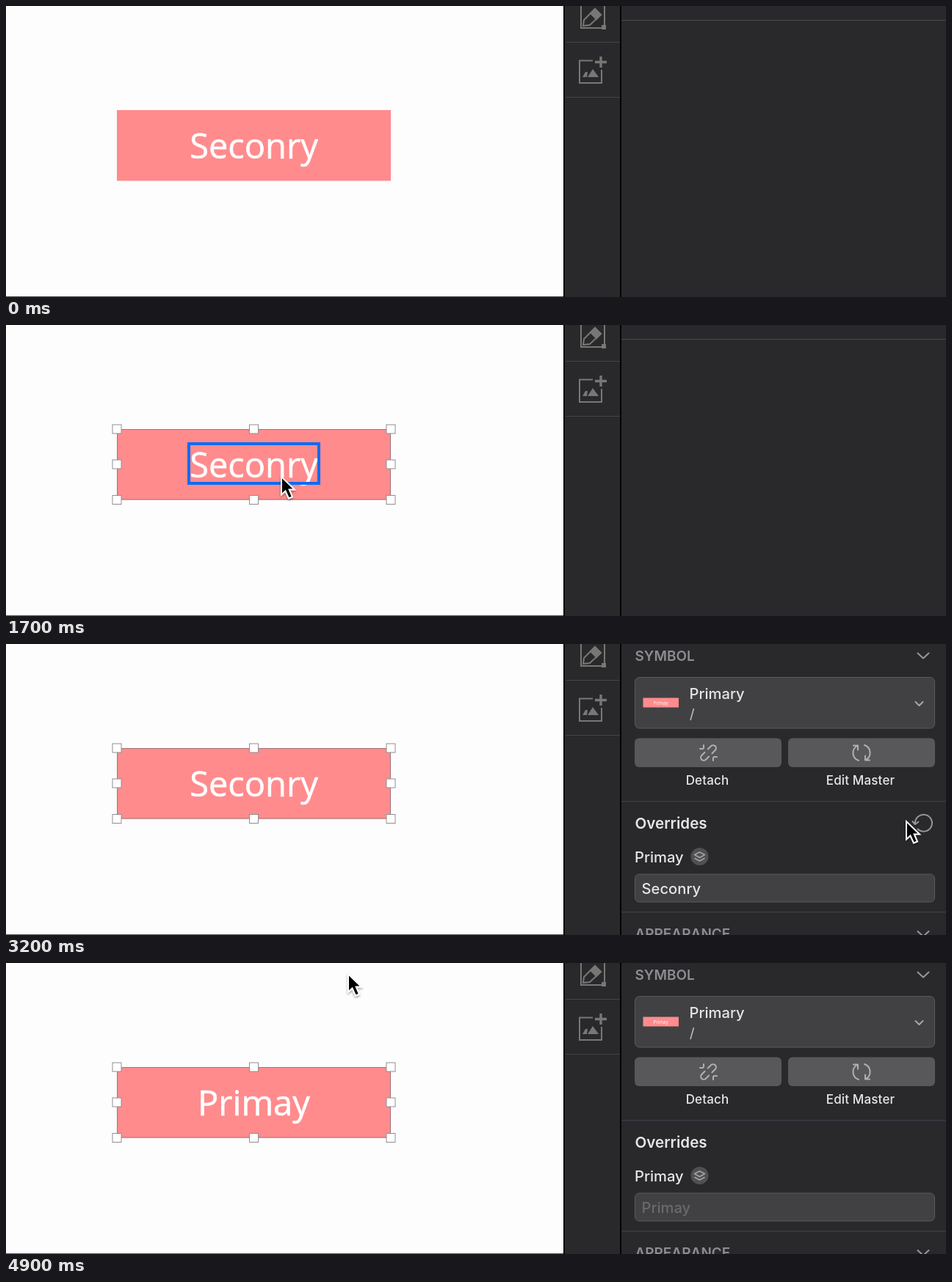
Write an HTML page that moves like this. It is 1280 by 397 pixels and loops after 5 s.

```html
<!DOCTYPE html>
<html lang="en">
<head>
<meta charset="utf-8">
<title>Reset a symbol override</title>
<style>
html, body { margin: 0; width: 100%; height: 100%; overflow: hidden; background: #fdfdfd; }
svg { display: block; width: 100%; height: 100%; }
text { font-family: Inter, Roboto, sans-serif; font-size: 20.2px; font-weight: 450; fill: #e6e6e8; }
.label { font-family: "Open Sans", "Noto Sans", sans-serif; font-size: 47px; font-weight: 400; fill: #fff; stroke: #fff; stroke-width: .6; text-anchor: middle; }
.tiny { font-family: "Open Sans", "Noto Sans", sans-serif; font-size: 6.2px; fill: #fff; text-anchor: middle; }
.title { font-size: 19px; font-weight: 600; fill: #8d8d92; }
.head { font-size: 20.6px; font-weight: 600; }
.small { font-size: 17px; font-weight: 500; letter-spacing: .15px; text-anchor: middle; }
.hint { fill: #6a6a6e; }
.line { fill: none; stroke-width: 2; stroke-linecap: round; stroke-linejoin: round; }
.box { fill: #414143; stroke: #5a5a5d; }
.button { fill: #58585b; }
.rule { fill: #3b3b43; }
.hover { fill: none; stroke: #0a6cf5; stroke-width: 4; }
</style>
</head>
<body>
<svg viewBox="0 0 1280 397" preserveAspectRatio="none">
  <defs>
    <filter id="drop" x="-50%" y="-50%" width="200%" height="200%">
      <feDropShadow dx="0" dy="2" stdDeviation="1.6" flood-opacity=".35"/>
    </filter>
  </defs>

  <!-- canvas -->
  <rect width="1280" height="397" fill="#fdfdfd"/>
  <rect y="396" width="760" height="1" fill="#55554f"/>
  <rect x="151" y="142" width="373" height="96.5" fill="#ff8b8d"/>
  <text id="label" class="label" x="337.5" y="207.5"></text>
  <rect id="hoverSymbol" class="hover" x="151" y="142" width="373" height="96.5"/>
  <g id="handles">
    <rect x="151.5" y="142.5" width="372" height="95.5" fill="none" stroke="#a27477"/>
  </g>
  <rect id="hoverText" class="hover" x="249" y="162" width="177" height="54"/>

  <!-- toolbar -->
  <rect x="759" width="521" height="397" fill="#29292b"/>
  <path d="M760 0V397M837 0V397" stroke="#000" stroke-width="2"/>
  <path d="M762 49.5H836M762 124.5H836" stroke="#454547"/>
  <g fill="none" stroke="#777775" stroke-width="2">
    <path d="M783 0V30H812M815 0V26"/>
    <path d="M786 27L787 19L802 4L810 12L795 26Z"/>
    <path d="M796 10L802 4L810 12L804 18Z" fill="#777775"/>
    <rect x="812" y="27" width="4" height="4" fill="#777775"/>
    <path d="M799 74.5H781V105H811V87"/>
    <path d="M802 76.5H818M810 69V84" stroke-width="3.4"/>
    <path d="M785 97L789 90H792L791 97ZM792 97L799 86L807 97Z" fill="#777775" stroke="none"/>
  </g>

  <!-- inspector -->
  <path id="emptyRule" d="M838 19.5H1280" stroke="#4b4b4d"/>
  <g id="panel">
    <text class="title" x="856.5" y="22.5">SYMBOL</text>
    <path class="line" d="M1241.5 12.5L1249 19.5L1256.5 12.5" stroke="#98989c"/>
    <rect class="box" x="856.5" y="45.5" width="408" height="69.5" rx="6"/>
    <rect x="867.5" y="73.5" width="48.5" height="13" fill="#ff8b8d"/>
    <text class="tiny" x="891.5" y="82.5">Primay</text>
    <text x="930.5" y="75">Primary</text>
    <path d="M932 104L936.5 88" stroke="#bbb" stroke-width="1.6"/>
    <path class="line" d="M1238.500 79L1243.5 84L1248.5 79" stroke="#a8a8ac"/>

    <rect class="button" x="856" y="128.5" width="200" height="39.5" rx="6"/>
    <rect class="button" x="1065" y="128.5" width="200" height="39.5" rx="6"/>
    <g class="line" stroke="#b0b0b3">
      <path transform="translate(956.5 148.5) rotate(-45)" d="M-3 -4H-9A4 4 0 0 0 -9 4H-3M3 -4H9A4 4 0 0 1 9 4H3"/>
      <path d="M950 138V142M945 143H949M963 155V159M964 154H968"/>
      <path d="M1169 138A11 11 0 0 1 1171 158M1176 158.5H1170V152.5M1161 159A11 11 0 0 1 1159 139M1154 138.5H1160V144.5"/>
    </g>
    <text class="small" x="955" y="192">Detach</text>
    <text class="small" x="1163.5" y="192">Edit Master</text>

    <rect class="rule" x="838" y="214" width="442" height="1.5"/>
    <text class="head" x="856.5" y="251.5">Overrides</text>
    <path id="reset" class="line" stroke="#98989c" d="M1238 244A11.5 11.5 0 1 1 1241.5 252.5M1234.5 242L1238 246L1242.5 242.5"/>
    <text x="856" y="298">Primay</text>
    <circle cx="944.5" cy="290" r="12" fill="#505053"/>
    <path class="line" d="M937.5 287.5L944.5 284L951.5 287.5L944.5 291.5ZM938 292.5L944.5 296L951 292.5" stroke="#a4a4a8" style="stroke-width:1.6"/>
    <rect class="box" x="856.5" y="314" width="408" height="38" rx="6"/>
    <text id="field" x="865.5" y="341"></text>
    <rect class="rule" x="838" y="365" width="442" height="1.5"/>
    <text class="title" x="856.5" y="402">APPEARANCE</text>
    <path class="line" d="M1241.5 392L1249 399L1256.5 392" stroke="#98989c"/>
  </g>

  <path id="cursor" d="M1 2V26.500L6.500 21.500L11 31.500L16 29.500L11.700 19.500H19Z" fill="#000" stroke="#fff" stroke-width="2" filter="url(#drop)"/>
</svg>
<script>
const LOOP = 5000, STEP = 100;
const SELECT = 1300, INSPECT = 1800, RESET = 3600;

// time, x, y of the pointer tip
const PATH = [
  [100, 817, 262], [400, 720, 262], [700, 530, 255], [900, 405, 226],
  [1100, 368, 217], [1300, 368, 216], [1500, 374, 205], [1900, 374, 205],
  [2100, 580, 226], [2300, 840, 246], [2500, 895, 247], [2700, 1010, 246],
  [3000, 1222, 240], [3200, 1225, 240], [3400, 1233, 240], [3900, 1233, 240],
  [4200, 1188, 281], [4800, 1188, 281], [4900, 465, 13]
];

const el = id => document.getElementById(id);
const show = (id, on) => el(id).setAttribute("visibility", on ? "visible" : "hidden");
const inside = ([x, y], l, t, r, b) => x >= l && x <= r && y >= t && y <= b;

function addHandles() {
  for (const x of [151, 337.5, 524]) for (const y of [142, 190, 238.5]) {
    if (x === 337.5 && y === 190) continue;
    const r = document.createElementNS(el("panel").namespaceURI, "rect");
    const attrs = { x: x - 6, y: y - 6, width: 12, height: 12, fill: "#fff", stroke: "#8f8f8f" };
    for (const k in attrs) r.setAttribute(k, attrs[k]);
    el("handles").append(r);
  }
}

function pointer(t) {
  const i = PATH.findIndex(p => p[0] >= t);
  if (i < 1) return PATH[0].slice(1);
  const [t0, x0, y0] = PATH[i - 1], [t1, x1, y1] = PATH[i];
  const k = (t - t0) / (t1 - t0);
  return [x0 + (x1 - x0) * k, y0 + (y1 - y0) * k];
}

function draw(now) {
  const t = Math.floor((now % LOOP) / STEP) * STEP;
  const tip = pointer(t);
  const selected = t >= SELECT, inspect = t >= INSPECT, reset = t >= RESET;

  show("cursor", t >= PATH[0][0]);
  el("cursor").setAttribute("transform", `translate(${tip})`);
  show("hoverSymbol", !selected && inside(tip, 151, 142, 524, 238));
  show("hoverText", selected && inside(tip, 247, 160, 428, 218));
  show("handles", selected);
  show("panel", inspect);
  show("emptyRule", !inspect);
  show("reset", inspect && !reset);

  const word = reset ? "Primay" : "Seconry";
  el("label").textContent = el("field").textContent = word;
  el("field").classList.toggle("hint", reset);
}

addHandles();
const start = performance.now();
function tick() {
  draw(performance.now() - start);
  requestAnimationFrame(tick);
}
tick();
</script>
</body>
</html>
```
